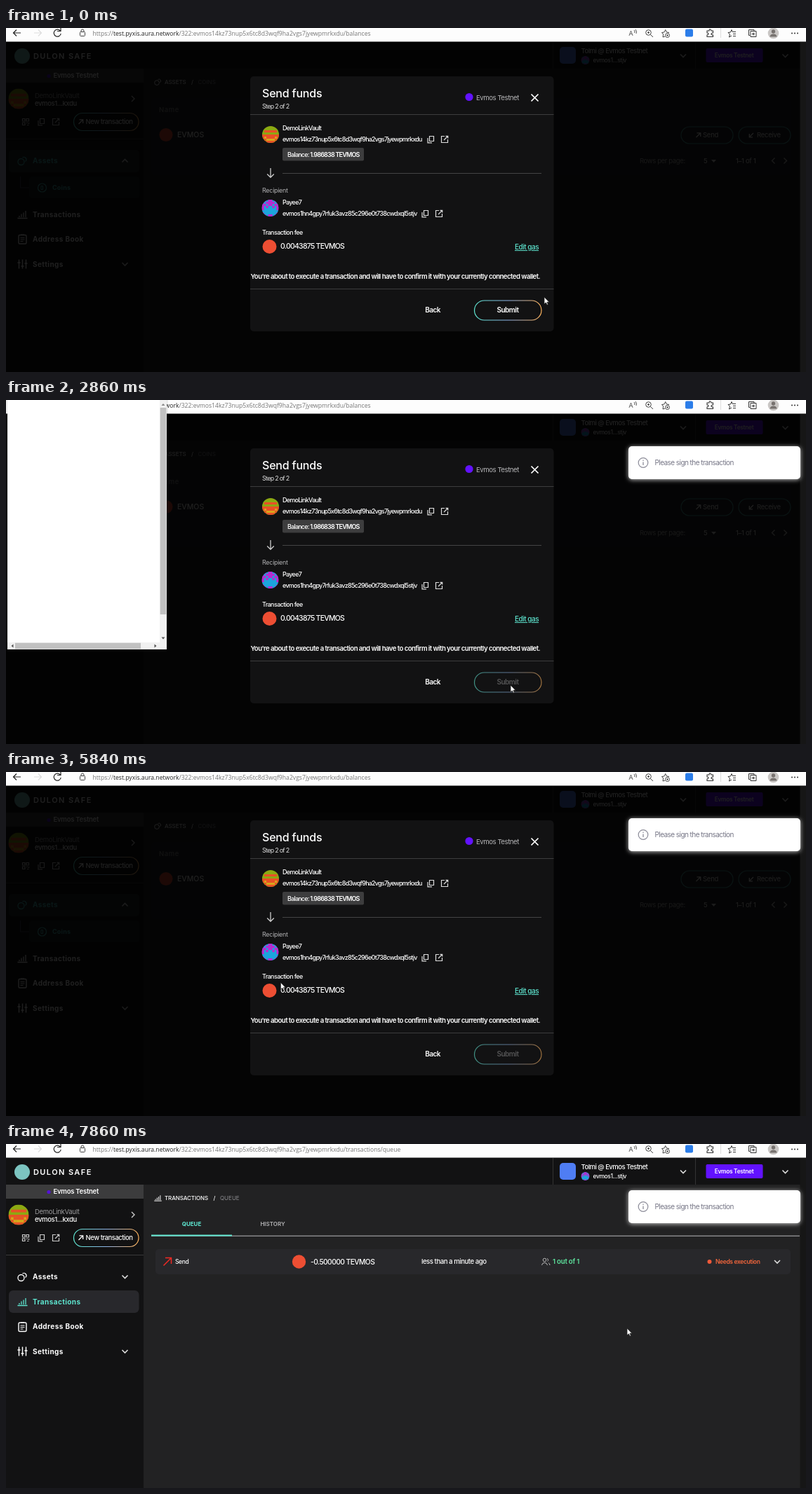
An HTML page for the animation above (8000 ms loop, 1140 by 491 pixels).

```html
<!DOCTYPE html>
<html lang="en">
<head>
<meta charset="utf-8">
<title>Send funds</title>
<style>
html, body { margin: 0; width: 100%; height: 100%; overflow: hidden; background: #000; }
svg { display: block; width: 1140px; height: 491px; font-family: Inter, "Liberation Sans", sans-serif; }
text { white-space: pre; }
.os { font-family: "Open Sans", "Noto Sans", sans-serif; }
</style>
</head>
<body>
<svg id="stage" viewBox="0 0 1140 491" xmlns="http://www.w3.org/2000/svg"></svg>
<script>
const LOOP = 8000;
const SAFE = 'evmos14kz73nup5x6tc8d3wqf9ha2vgs7jyewpmrkxdu';
const PAYEE = 'evmos1hn4gpy7rfuk3avz85c296e0t738cwdxql5stjv';
const TEAL = '#5ee6d0', CORAL = '#ed4e33', VIOLET = '#6212ff', WHITE = '#fff';

// Drawing helpers: y is the middle of the capitals.
const text = (x, y, s, size, fill = WHITE, ls = 0, weight = 400, extra = '') =>
  `<text x="${x}" y="${y + size * 0.36}" font-size="${size}" fill="${fill}" letter-spacing="${ls}" font-weight="${weight}" ${extra}>${s}</text>`;
const mid = (x, y, s, size, fill, ls, weight, extra = '') =>
  text(x, y, s, size, fill, ls, weight, 'text-anchor="middle" ' + extra);
const sans = (x, y, s, size, fill, weight = 400, extra = '') =>
  text(x, y, s, size, fill, 0, weight, 'class="os" ' + extra);
const rect = (x, y, w, h, fill, r = 0, extra = '') =>
  `<rect x="${x}" y="${y}" width="${w}" height="${h}" rx="${r}" fill="${fill}" ${extra}/>`;
const circle = (x, y, r, fill, extra = '') => `<circle cx="${x}" cy="${y}" r="${r}" fill="${fill}" ${extra}/>`;
const line = (d, stroke = WHITE, w = 1, extra = '') =>
  `<path d="${d}" fill="none" stroke="${stroke}" stroke-width="${w}" ${extra}/>`;
const shape = (d, fill) => `<path d="${d}" fill="${fill}"/>`;
const group = (id, body, extra = '') => `<g id="${id}" ${extra}>${body}</g>`;
const pill = (x, y, w, h, stroke, extra = '') => rect(x, y, w, h, 'none', h / 2, `stroke="${stroke}" stroke-width="1.2" ${extra}`);

// Icons, placed by their centre.
const at = (x, y, body, k = 1) => `<g transform="translate(${x} ${y}) scale(${k})">${body}</g>`;
const copy = (x, y, c = '#ddd') => at(x, y, line('M-1.5-4.5H4.5V2.5H-1.5ZM-4-2V4.8H2', c, 1.2));
const share = (x, y, c = '#ddd') => at(x, y, line('M0-4.5H-4.5V4.5H4.5V0M1.5-4.7H4.7V-1.5M4.5-4.5L-1 1', c, 1.2));
const down = (x, y, c = '#ddd') => at(x, y, line('M-4-2L0 2L4-2', c, 1.6));
const up = (x, y, c) => at(x, y, line('M-4 2L0-2L4 2', c, 1.6));
const right = (x, y, c = '#ccc') => at(x, y, line('M-2-4L2 0L-2 4', c, 1.4));
const left = (x, y, c = '#ccc') => at(x, y, line('M2-4L-2 0L2 4', c, 1.4));
const outArrow = (x, y, c = WHITE) => at(x, y, line('M-3 3L3-3M-2-3.2H3.2V2', c, 1.3));
const chart = (x, y, c = WHITE) => at(x, y, line('M-4.5 2V4M-1.5-.5V4M1.5-2.5V4M4.5-5V4M-7 5.5H7', c, 1.3));
const coins = (x, y, c = WHITE) => at(x, y, circle(-2, 1.5, 4.5, 'none', `stroke="${c}" stroke-width="1.3"`) + line('M0-4.5A3.2 3.2 0 1 1 4 1', c, 1.3));
const book = (x, y, c = WHITE) => at(x, y, rect(-5.5, -5.5, 11, 12.5, 'none', 1.5, `stroke="${c}" stroke-width="1.4"`) + line('M-2.5-6H2.5M-3-1.5H3M-3 1H3M-3 3.5H1', c, 1.2));
const sliders = (x, y, c = WHITE) => at(x, y, line('M-5-6.5V6.5M0-6.5V6.5M5-6.5V6.5M-7-2H-3M-2 3H2M3-1H7', c, 1.4));
const grid = (x, y, c) => at(x, y, line('M-4.5-4.5H-1V-1H-4.5ZM1-4.5H4.5V-1H1ZM-4.5 1H-1V4.5H-4.5ZM1 1.5H3M4.5 1V3M2 4.5H4.5', c, 1.2));

// Mirrored 8 by 8 block avatar.
function avatar(x, y, r, colors, rows) {
  const c = r / 4, id = `clip${x}`;
  const cells = rows.map((row, j) => [...row].map((v, i) => v === '0' ? '' :
    rect(x - r + i * c, y - r + j * c, c + .1, c + .1, colors[v]) +
    rect(x + r - (i + 1) * c, y - r + j * c, c + .1, c + .1, colors[v])).join('')).join('');
  return `<clipPath id="${id}">${circle(x, y, r, WHITE)}</clipPath><g clip-path="url(#${id})">${rect(x - r, y - r, 2 * r, 2 * r, colors[0])}${cells}</g>`;
}
const safeFace = (x, y, r) => avatar(x, y, r, ['#8ca912', '#ea5026', '#d9a61c'],
  ['0000', '0000', '0111', '0000', '1111', '1211', '0122', '0011']);
const payeeFace = (x, y, r) => avatar(x, y, r, ['#1ba5dc', '#c322cf'],
  ['1101', '1011', '1101', '1010', '1000', '0000', '1000', '1101']);

function browserBar() {
  const ink = '#444';
  const url = (id, path) => sans(123.5, 7.5,
    `https://<tspan fill="#222">test.pyxis.aura.network</tspan>/322:${SAFE}/${path}`, 8.63, '#777', 400, `id="${id}"`);
  return rect(0, 0, 1140, 19.5, '#fdfdfd') +
    line('M21 7H10M15 2.5L10.5 7L15 11.5', '#222', 1.2) +
    line('M40 7H50M46 2.5L50.5 7L46 11.5', '#ddd', 1.2) +
    line('M77.5 4.5A5 5 0 1 0 78.2 8M78-.5V4.5H73', '#222', 1.2) +
    rect(105.5, 5.5, 7, 6, 'none', 1, `stroke="${ink}"`) + line('M107 5.5V4A2 2 0 0 1 111 4V5.5', ink) +
    url('urlA', 'balances') + url('urlB', 'transactions/queue') +
    sans(887.5, 8, 'A', 9.5, ink) + line('M895 3Q897 5 895.5 7M897 2Q899.5 5 898 8', ink, .9) +
    circle(915.5, 6.5, 3.8, 'none', `stroke="${ink}"`) + line('M918.5 9.5L922 13M914 6.5H917M915.5 5V8', ink) +
    line('M939 12L936 13L936.7 9L934.5 6.5L938 6L939.7 2.5L941.5 6L945 6.5', ink) +
    circle(942.5, 10.5, 3, 'none', `stroke="${ink}"`) + line('M941 10.5H944M942.5 9V12', ink, .8) +
    rect(968, 1.5, 11, 11, '#2b7de9', 2) +
    line('M999 4H1002Q1002 1.5 1003.5 2T1005 4H1007.5V7Q1005 7 1005 8.5T1007.5 10V12.5H999V10Q1001 9.5 1001 8.2T999 7Z', '#333', 1.1) +
    line('M1018.5 0V14', '#ddd') +
    line('M1034 11L1030.5 13L1031.5 9L1029 6.5L1032.5 6L1034 2.5L1035.5 6M1036 5.5H1040M1036 8.5H1040M1036 11.5H1040', '#333') +
    line('M1060 10.5H1058.5V2.5H1066V4M1061 4.5H1069V12.5H1061ZM1065 6.5V10.5M1063 8.5H1067', '#333') +
    circle(1093.5, 7.5, 7.8, '#c9c6c4') + circle(1093.5, 5, 2.7, '#77726f') + shape('M1088.5 12.5Q1089 8.5 1093.5 8.5T1098.5 12.5Z', '#77726f') +
    [1120, 1124, 1128].map(x => circle(x, 7.5, 1, '#333')).join('');
}

function shell() {
  return rect(0, 19, 1140, 472, '#222223') + rect(0, 19, 1140, 39, '#121213') + rect(0, 58, 196, 433, '#121213') +
    circle(23, 40, 11, '#7cc4c0') + text(39, 40.5, 'DULON SAFE', 11, WHITE, 1.4, 600) +
    line('M779.5 20V58M982.5 20V58', '#333') +
    rect(789, 27, 23, 24, '#4f7df3', 5) + text(819.5, 33, 'Tolmi @ Evmos Testnet', 9.5, WHITE, -.52, 500) +
    payeeFace(825.5, 46, 6) + text(836.5, 45.5, 'evmos1...stjv', 8.5, WHITE, -.4, 500) + down(965, 39.5) +
    rect(997.5, 29, 81, 20, VIOLET, 2) + mid(1037.5, 39, 'Evmos Testnet', 8.3, WHITE, -.27, 600) + down(1110.5, 39.5) +
    rect(0, 58, 196, 20, '#3c3c3d') + circle(61, 68.5, 2.6, '#5412d8') + text(67.5, 68, 'Evmos Testnet', 9.5, WHITE, -.25, 600) +
    safeFace(18, 101, 14.5) + text(41, 96.5, 'DemoLinkVault', 9.5, '#9a9a9c', -.3) +
    text(41, 108, 'evmos1...kxdu', 9.5, WHITE, -.37, 500) + right(181, 101) +
    grid(28, 134, '#ccc') + copy(50, 134, '#ccc') + share(71, 134, '#ccc') +
    pill(96.5, 121.5, 92.5, 25, 'url(#edge)') + outArrow(106.5, 134) + text(113.5, 134, 'New transaction', 9.5, WHITE, -.47, 500) +
    line('M0 158.5H196', '#3a3a3b');
}
const nav = (y, icon, label, c = WHITE) => icon(23.5, y, c) + text(38, y, label, 10, c, .4, 700);
const crumbs = (icon, a, b, x) => at(216.5, 77, icon(0, 0), .75) + text(226, 77, a, 8, WHITE, -.1, 500) + text(x, 77, '/', 8, WHITE, 0, 500) + text(x + 9.5, 77, b, 8, '#8d8d90');

function coinsPage() {
  const btn = (x, w) => pill(x, 141, w, 24, '#479a98');
  const cyan = '#48b9b4';
  return rect(4, 174, 186, 32, '#1e2a2d', 5) + nav(189.5, coins, 'Assets', cyan) + up(169.5, 189.5, '#ddd') +
    rect(33, 212, 157, 31, '#182224', 5) + line('M20.5 212V228H33', '#445') +
    circle(51.5, 228, 6, 'none', `stroke="${cyan}" stroke-width="1.2"`) + line('M50 225.5V230.5H52.5V225.5Z', cyan) +
    text(66, 228, 'Coins', 9, cyan, .2, 700) +
    nav(266, chart, 'Transactions') + nav(301, book, 'Address Book') + nav(337, sliders, 'Settings') + down(169.5, 337) +
    crumbs(coins, 'ASSETS', 'COINS', 264) +
    rect(207, 100, 911, 110, '#252528', 5) + text(218, 117, 'Name', 9.5, '#8d8d90', .6, 500) +
    circle(228, 152.5, 9.5, CORAL) + text(244, 152.5, 'EVMOS', 10.5, WHITE, 0, 500) +
    btn(962, 74) + outArrow(986.5, 153) + text(993, 153, 'Send', 9.5, WHITE, -.25) +
    btn(1044, 74) + line('M1065 150L1059.5 155.5M1059.3 151V155.8H1064', WHITE, 1.3) + text(1070, 153, 'Receive', 9.5, WHITE, -.25) +
    text(903, 189.5, 'Rows per page:', 9.5, '#bbb', -.36) + text(994, 189.5, '5', 9.5) + shape('M1005 188H1012L1008.5 192Z', '#ddd') +
    text(1040, 189.5, '1–1 of 1', 9.5, WHITE, -.3) + left(1093.5, 189.5) + right(1110.5, 189.5);
}

function queuePage() {
  return rect(4, 209, 185.5, 32, '#28282c', 6) + nav(189.5, coins, 'Assets') + down(169.5, 189.5) +
    nav(225, chart, 'Transactions', TEAL) + nav(260.5, book, 'Address Book') + nav(296, sliders, 'Settings') + down(169.5, 296) +
    crumbs(chart, 'TRANSACTIONS', 'QUEUE', 295.5) +
    mid(264.5, 114, 'QUEUE', 8, TEAL, 0, 700) + mid(380, 114, 'HISTORY', 8, '#b4b4b6', 0, 600) +
    line('M207 131.2H1131', '#b9b9bb', 1) + line('M207 130.5H322', TEAL, 2) +
    rect(213, 150, 905, 36, '#28282b', 5) + line('M224.5 173.5L235.5 162.5M227 162.5H235.5V171', '#f02a24', 1.5) +
    text(241, 168, 'Send', 8.5, WHITE, -.4, 500) + circle(417.5, 168, 9.7, CORAL) +
    text(434, 168, '-0.500000 TEVMOS', 10.3, WHITE, -.58, 500) + text(592, 168, 'less than a minute ago', 9.6, WHITE, -.47, 500) +
    circle(767.5, 165.5, 2.3, 'none', 'stroke="#bbb"') + line('M763.5 173Q764 169.5 767.5 169.5T771.5 173M771 163.5A2.2 2.2 0 0 1 771.5 167.5M773 169.7Q775 170.5 775 173', '#bbb') +
    text(779, 168, '1 out of 1', 9.6, '#5fe8a0', -.2, 600) +
    circle(1002.5, 168, 3, '#ee5a3a') + text(1011, 168, 'Needs execution', 8.5, '#f2663c', -.36, 600) + down(1099, 168);
}

function modal() {
  return rect(348, 69, 432.5, 364, '#121213', 5) +
    text(365, 93.5, 'Send funds', 16, WHITE, -.2, 500) + text(365, 111.5, 'Step 2 of 2', 9, '#ddd', -.75) +
    circle(660, 98.5, 5.6, VIOLET) + text(670, 100, 'Evmos Testnet', 9.6, '#b8b8ba', -.45) +
    line('M748.5 94.5L758.5 104.5M758.5 94.5L748.5 104.5', WHITE, 1.7) +
    line('M348 123.5H780.5M348 372.5H780.5', '#3d3d3e') +
    safeFace(377, 152, 12) + text(394, 143, 'DemoLinkVault', 9, WHITE, -.75, 500) + text(394, 158.5, SAFE, 9, WHITE, -.78, 500) +
    copy(605, 159) + share(625, 159) +
    rect(394, 171, 116, 18.5, '#3d3d3e', 2) + text(401, 180.3, 'Balance: <tspan font-weight="600">1.986838 TEVMOS</tspan>', 9, WHITE, -.8, 500) +
    line('M377 200V213M372.2 208.5L377 213.3L381.8 208.5', '#ccc', 1.3) + line('M394 207.5H763', '#444') +
    text(365, 231.5, 'Recipient', 9, '#b0b0b2', -.3) +
    payeeFace(376.5, 257, 12) + text(394, 248.5, 'Payee7', 9, WHITE, -.7, 500) + text(394, 265, PAYEE, 9, WHITE, -.72, 500) +
    copy(597, 265) + share(617, 265) +
    text(365, 292, 'Transaction fee', 9, WHITE, -.61, 500) + circle(375.5, 312, 10, CORAL) +
    text(391, 311.5, '0.0043875 TEVMOS', 10.5, WHITE, -.75, 500) +
    text(725, 312.5, 'Edit gas', 10, TEAL, -.5, 500, 'text-decoration="underline"') +
    text(348.5, 354.5, "You're about to execute a transaction and will have to confirm it with your currently connected wallet.", 9.6, WHITE, -.545, 600) +
    mid(608, 402.5, 'Back', 10, WHITE, -.55, 600) +
    pill(667.5, 389, 95.5, 28, 'url(#edge)', 'id="submitEdge"') +
    mid(715, 402.5, 'Submit', 10, WHITE, -.5, 600, 'id="submitText"');
}

function toast() {
  return rect(887, 66, 245, 47, WHITE, 5, 'filter="url(#glow)"') +
    circle(908, 89.5, 6.8, 'none', 'stroke="#8b8b98" stroke-width="1.2"') + line('M908 88.5V93M908 85.5V87', '#8b8b98', 1.3) +
    text(924.5, 89.5, 'Please sign the transaction', 10, '#757585', -.56);
}

function popup() {
  const bars = rect(219, 0, 10, 346, '#f1f1f1') + rect(2, 346, 227, 10, '#f1f1f1') +
    rect(219.7, 11, 8.6, 295, '#c1c1c1') + rect(13, 346.7, 179, 8.6, '#c1c1c1') +
    shape('M221.5 8H226.5L224 5Z', '#888') + shape('M221.5 338.5H226.5L224 341.5Z', '#555') +
    shape('M10.5 348.5V353.5L7.5 351Z', '#555') + shape('M211.5 348.5V353.5L214.5 351Z', '#555');
  const c = 'text-anchor="middle"', grey = '#525f7f', blue = '#5e72e4';
  const content = sans(119, 20, 'Evmos Testnet', 15.2, '#222', 400, c) +
    sans(65.5, 49.5, 'Details', 10.4, '#4d6be0', 400, c) + sans(175.5, 49.5, 'Data', 10.4, '#222', 400, c) +
    line('M120 63.5H231M10 126.5H231', '#e4e4e8') + line('M10 63.5H120', '#6f83e6', 1.2) +
    sans(10, 81, 'Messages', 9.2, grey) + rect(57, 74.5, 12, 13, '#dfe4fb', 3) + sans(63, 81, '1', 7, blue, 600, c) +
    shape('M17 102L30.5 94L28.5 106L24.5 104L22.5 107L21.5 103.2L28 96.5L20 102.8Z', '#111') +
    sans(38, 100.5, 'Send', 10.3, '#222', 700) +
    sans(38, 114, '<tspan font-weight="700">evmos1hn4gpy...5stjv</tspan> will receive <tspan font-weight="700">0.5 TEVMOS</tspan>', 7.75, '#7b7b82') +
    sans(10, 255.5, 'Memo', 8.7, grey) + sans(10, 275.5, '(Empty memo)', 10.1, '#a5a5ab') +
    sans(10, 295.5, 'Fee', 9, grey) + sans(10, 315, '0.004387 TEVMOS', 11, '#222') + sans(10, 328.5, 'Override fee', 8.1, '#4d6be0') +
    rect(10.5, 344.5, 105.5, 28, WHITE, 3, 'stroke="#f2668a"') + sans(63, 358.5, 'Reject', 9.3, '#f5365c', 600, c) +
    group('approve', rect(124.5, 344.5, 106, 28, blue, 3, 'id="approveBox" filter="url(#soft)"') + sans(177.5, 358.5, 'Approve', 8.9, WHITE, 700, c));
  return rect(2, -8, 227, 364, WHITE, 3, 'id="popupBox" filter="url(#soft)"') + group('bars', bars) + group('content', content);
}

const stage = document.getElementById('stage');
stage.innerHTML = `<defs>
  <linearGradient id="edge"><stop stop-color="#5ee6d0"/><stop offset=".5" stop-color="#8fb4e8"/><stop offset="1" stop-color="#ffb35c"/></linearGradient>
  <filter id="glow" x="-20%" y="-50%" width="140%" height="200%"><feDropShadow dx="0" dy="1" stdDeviation="3" flood-color="#fff" flood-opacity=".75"/></filter>
  <filter id="soft" x="-20%" y="-50%" width="140%" height="200%"><feDropShadow dx="0" dy="1" stdDeviation="1.5" flood-color="#000" flood-opacity=".25"/></filter>
  </defs>` +
  shell() + group('pageA', coinsPage()) + group('pageB', queuePage()) +
  group('dialog', rect(0, 19, 1140, 472, '#000', 0, 'opacity=".88"') + modal()) +
  rect(1131.5, 20, 8.5, 471, '#161616') + browserBar() +
  group('toast', toast()) + group('popup', popup()) +
  group('cursor', '<path d="M0 0V10L2.4 7.9L4 11.2L5.5 10.5L4 7.3H7Z" fill="#fff" stroke="#222" stroke-width=".8"/>');
const el = Object.fromEntries([...stage.querySelectorAll('[id]')].map(n => [n.id, n]));

// Rows of time followed by values, joined linearly.
const cursorPath = [
  [600, 767, 384], [1060, 719, 407], [2880, 719, 407], [3000, 659, 373], [3190, 405, 354], [3360, 405, 354],
  [3600, 215, 205], [3770, 142, 164.5], [3830, 142, 164.5], [3980, 134, 240], [4150, 168, 353], [4520, 169, 355],
  [4840, 178, 362], [5660, 178, 362], [6180, 791, 185], [6220, 791, 185], [6320, 796, 200], [6740, 796, 201], [7190, 885, 263]];
const toastSlide = [[1990, 300], [2060, 190], [2130, 92], [2200, 6], [2270, -14], [2340, 6], [2410, -3], [2470, 0]];
const submitFade = [[1430, 1], [1670, 0]];
const hover = [[4190, 0], [4360, 1]];
const dialogFade = [[7600, 1], [7830, 0]];

function track(rows, t) {
  if (t <= rows[0][0]) return rows[0].slice(1);
  const i = rows.findIndex(r => r[0] > t);
  if (i < 0) return rows[rows.length - 1].slice(1);
  const a = rows[i - 1], b = rows[i], k = (t - a[0]) / (b[0] - a[0]);
  return a.slice(1).map((v, j) => v + (b[j + 1] - v) * k);
}
const show = (node, on) => node.setAttribute('visibility', on ? 'inherit' : 'hidden');
const move = (node, x, y) => node.setAttribute('transform', `translate(${x} ${y})`);

function render(t) {
  const queue = t >= 7600, loaded = t >= 3000;
  show(el.pageA, !queue); show(el.urlA, !queue);
  show(el.pageB, queue); show(el.urlB, queue);

  const [fade] = track(dialogFade, t);
  el.dialog.setAttribute('opacity', fade);
  const [active] = track(submitFade, t);
  el.submitEdge.setAttribute('opacity', .6 + .4 * active);
  el.submitText.setAttribute('opacity', .28 + .72 * active);

  show(el.toast, t >= 2020);
  move(el.toast, track(toastSlide, t)[0], 0);

  show(el.popup, t >= 2410 && t < 5710);
  show(el.bars, t >= 2860 && t < 5710 && !loaded);
  show(el.content, loaded && t < 5710);
  el.popupBox.setAttribute('width', loaded ? 236.5 : 227);
  el.popupBox.setAttribute('height', loaded ? 387.5 : 364);

  const [h] = track(hover, t);
  const mix = (a, b) => Math.round(a + (b - a) * h);
  el.approveBox.setAttribute('fill', `rgb(${mix(94, 50)},${mix(114, 76)},${mix(228, 221)})`);
  move(el.approve, 0, -.7 * h);
  move(el.cursor, ...track(cursorPath, t));
}

const start = performance.now();
function tick() {
  render((performance.now() - start) % LOOP);
  requestAnimationFrame(tick);
}
tick();
</script>
</body>
</html>
```
